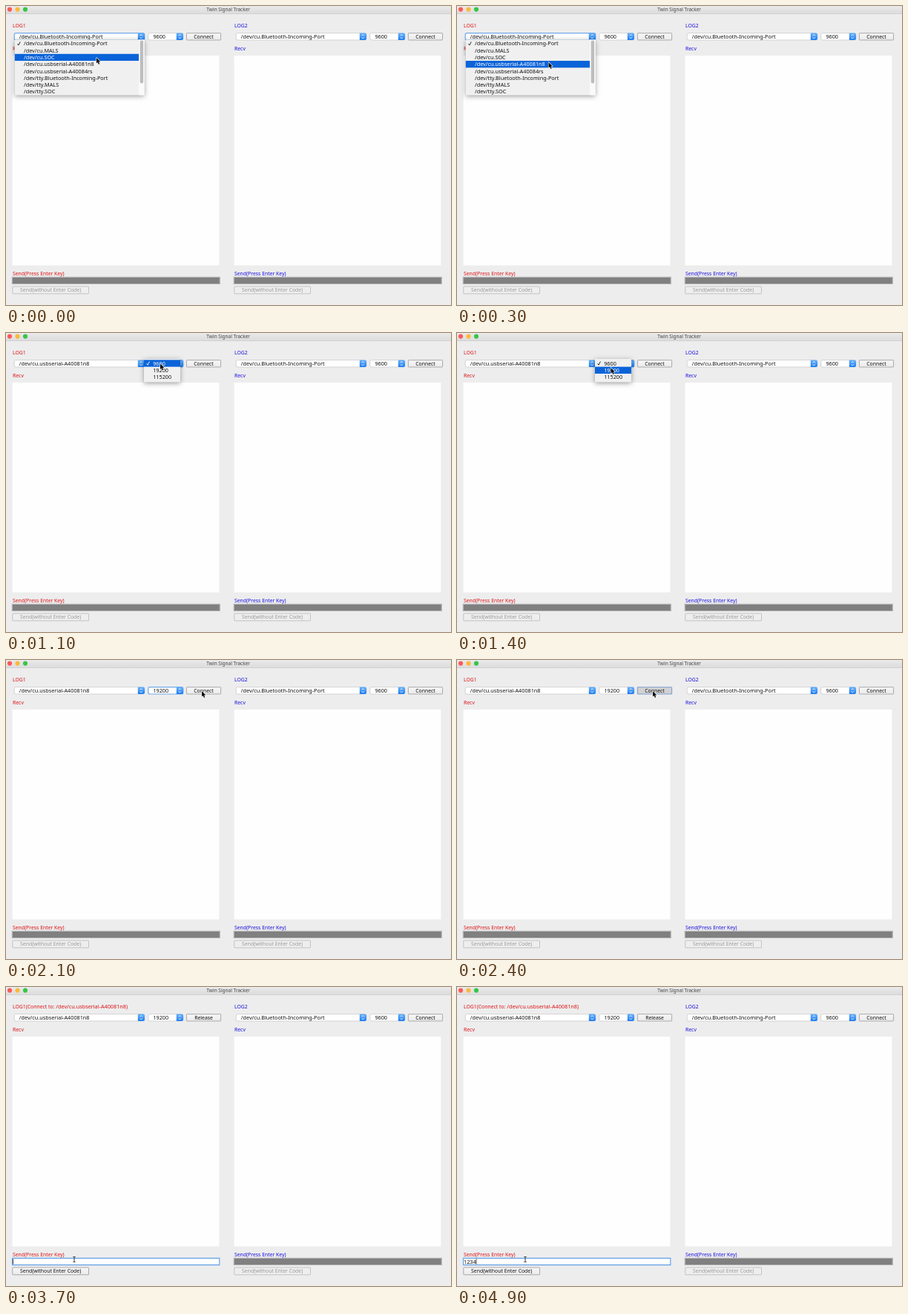
Animation, 600 px wide and 404 px high, one loop 5000 ms. Source, as an HTML page with a canvas:

```html
<!DOCTYPE html>
<html lang="en">
<head>
<meta charset="utf-8">
<title>Twin Signal Tracker</title>
<style>
html, body { margin: 0; width: 100%; height: 100%; overflow: hidden; background: #ededee; }
canvas { display: block; width: 600px; height: 404px; }
</style>
</head>
<body>
<canvas id="stage"></canvas>
<script>
const W = 600, H = 404, LOOP = 5000, STEP = 100;
const canvas = document.getElementById('stage');
const ctx = canvas.getContext('2d');
const dpr = window.devicePixelRatio || 1;
canvas.width = W * dpr;
canvas.height = H * dpr;

const RED = '#dc1414', BLUE = '#1a10dc', FOCUS = '#6fa9e6', PICK = '#0a63d8';
const LABEL = 6.85, VALUE = 7.28, ROW = 9.3;
const DEFAULT_PORT = '/dev/cu.Bluetooth-Incoming-Port';
const USB_PORT = '/dev/cu.usbserial-A40081n8';
const PORTS = [DEFAULT_PORT, '/dev/cu.MALS', '/dev/cu.SOC', USB_PORT,
  '/dev/cu.usbserial-A40084rs', '/dev/tty.Bluetooth-Incoming-Port',
  '/dev/tty.MALS', '/dev/tty.SOC'];
const RATES = ['9600', '19200', '115200'];

// pointer keys: time, x, y
const PATH = [
  [0, 122, 70], [100, 122, 72], [200, 123, 75], [300, 123.5, 76],
  [600, 123.5, 76], [700, 140, 68], [1000, 208, 40], [1200, 208, 43],
  [1400, 207.5, 47], [1700, 207.5, 47], [2100, 264, 42], [2500, 264, 42],
  [2800, 215, 160], [3100, 91, 383], [3200, 90, 387], [3400, 91, 381],
  [3600, 92, 368]
];
const KEYS = [[4300, '1'], [4400, '12'], [4700, '123'], [4900, '1234']];

function pointer(t) {
  for (let i = 1; i < PATH.length; i++) {
    const [t1, x1, y1] = PATH[i];
    if (t <= t1) {
      const [t0, x0, y0] = PATH[i - 1];
      const k = (t - t0) / (t1 - t0);
      return { x: x0 + (x1 - x0) * k, y: y0 + (y1 - y0) * k };
    }
  }
  const [, x, y] = PATH[PATH.length - 1];
  return { x, y };
}

function text(str, x, cy, size, color, align = 'left') {
  ctx.font = `${size}px "Noto Sans", "Open Sans", sans-serif`;
  ctx.textAlign = align;
  ctx.fillStyle = color;
  ctx.fillText(str, x, cy + 2.5);
  return ctx.measureText(str).width;
}

function rect(x, y, w, h, fill) {
  ctx.fillStyle = fill;
  ctx.fillRect(x, y, w, h);
}

function box(x, y, w, h, r, fill, stroke, line = 0.8) {
  ctx.beginPath();
  ctx.roundRect(x, y, w, h, r);
  ctx.fillStyle = fill;
  ctx.fill();
  if (!stroke) return;
  ctx.strokeStyle = stroke;
  ctx.lineWidth = line;
  ctx.stroke();
}

function shade(y0, y1, a, b) {
  const g = ctx.createLinearGradient(0, y0, 0, y1);
  g.addColorStop(0, a);
  g.addColorStop(1, b);
  return g;
}

function poly(points, color, line) {
  ctx.beginPath();
  points.forEach(([x, y]) => ctx.lineTo(x, y));
  ctx.strokeStyle = color;
  ctx.lineWidth = line;
  ctx.stroke();
}

function titleBar() {
  rect(0, 0, W, 10, shade(0, 10, '#ebeaeb', '#dddcdd'));
  rect(0, 10, W, 0.7, '#c6c5c6');
  ['#fc5b57', '#fbb93c', '#35c649'].forEach((color, i) => {
    ctx.beginPath();
    ctx.arc(5 + i * 10.5, 4.6, 3.1, 0, Math.PI * 2);
    ctx.fillStyle = color;
    ctx.fill();
  });
  text('Twin Signal Tracker', 299.7, 4.8, 6.5, '#444', 'center');
}

function combo(x, w, value, focused) {
  const y = 36.6, h = 9.4, end = x + w;
  box(x, y, w, h, 2, '#fff', focused ? FOCUS : '#c4c4c6', focused ? 1.2 : 0.7);
  box(end - 9, y, 9.2, h, [0, 2, 2, 0], shade(y, y + h, '#68b1fa', '#1c7cf2'));
  const cx = end - 4.5, cy = y + h / 2;
  for (const s of [-1, 1])
    poly([[cx - 1.6, cy + s], [cx, cy + s * 2.7], [cx + 1.6, cy + s]], '#fff', 0.9);
  text(value, x + 6.6, 41, VALUE, '#111');
}

function button(x, y, w, h, label, { off, focused, down } = {}) {
  const edge = focused ? '#7f9fd0' : off ? '#c0c0c2' : '#a2a2a4';
  const fill = down ? '#d2d2d4' : off ? '#eeeeef' : shade(y, y + h, '#f7f7f8', '#ebebec');
  box(x, y, w, h, 0.5, fill, edge, focused ? 1.1 : 0.9);
  text(label, x + w / 2, y + h / 2 - 0.2, LABEL, off ? '#999' : '#111', 'center');
}

function input(x, on, focused, value, caret) {
  if (!on) {
    box(x + 8.3, 366.3, 280, 9.2, 0, '#808080', '#b4b4b6', 1.2);
    return;
  }
  box(x + 8.5, 366.5, 279.3, 9, 0, focused ? '#fff' : '#f9f9fa',
    focused ? FOCUS : '#c6c6c8', focused ? 1.3 : 0.9);
  const width = text(value, x + 9, 371, VALUE, '#111');
  if (caret) rect(x + 9 + width, 367.5, 0.8, 7, '#222');
}

function panel(x, n, color, s) {
  const head = text('LOG' + n, x + 9, 26, LABEL, color);
  if (s.on) {
    let end = x + 9 + head;
    end += text('(Connect to: ', end, 26, LABEL, color);
    end += text(s.port, end, 26, VALUE, color);
    text(')', end, 26, LABEL, color);
  }
  combo(x + 11.2, 175.6, s.port, s.focus === 'port');
  combo(x + 191.8, 47, s.rate, s.focus === 'rate');
  button(x + 243.4, 36.7, 46.2, 9.3, s.on ? 'Release' : 'Connect',
    { focused: s.focus === 'button', down: s.down });
  text('Recv', x + 9, 57, LABEL, color);
  rect(x + 8.6, 67, 278.8, 283.5, '#fefefe');
  text('Send(Press Enter Key)', x + 9, 361, LABEL, color);
  input(x, s.on, s.focus === 'input', s.typed || '', s.caret);
  button(x + 8.8, 379, 102.7, 9.8, 'Send(without Enter Code)', { off: !s.on });
}

function menu(x, y, w, h, top, items, hot, scroll) {
  ctx.save();
  ctx.shadowColor = 'rgba(0,0,0,.38)';
  ctx.shadowBlur = 6 * dpr;
  ctx.shadowOffsetY = 1.5 * dpr;
  box(x, y, w, h, 1, '#f0f0f0');
  ctx.restore();
  const inner = scroll ? w - 7.5 : w;
  items.forEach((item, i) => {
    const cy = top + i * ROW;
    if (i === hot) rect(x, cy - ROW / 2, inner, ROW, PICK);
    const ink = i === hot ? '#fff' : '#111';
    text(item, x + 12.2, cy, VALUE, ink);
    if (i === 0)
      poly([[x + 3.6, cy + 0.3], [x + 5, cy + 2.2], [x + 7.4, cy - 2.4]], ink, 0.9);
  });
  if (scroll) {
    rect(x + inner, y, w - inner, h, '#fafafa');
    box(x + inner + 1.6, y + 1, 4.4, 58, 2, '#bdbdbf');
  }
}

function arrow(x, y) {
  const shape = [[0, 0], [0, 7.6], [1.7, 6.1], [2.9, 8.9], [4.2, 8.3], [3, 5.6], [5.3, 5.4]];
  ctx.beginPath();
  shape.forEach(([dx, dy]) => ctx.lineTo(x + dx, y + dy));
  ctx.closePath();
  ctx.lineJoin = 'round';
  ctx.strokeStyle = '#fff';
  ctx.lineWidth = 1.2;
  ctx.stroke();
  ctx.fillStyle = '#000';
  ctx.fill();
  ctx.lineJoin = 'miter';
}

function beam(x, y) {
  rect(x - 0.45, y - 3.6, 0.9, 7.2, '#222');
  rect(x - 1.7, y - 4, 3.4, 0.8, '#333');
  rect(x - 1.7, y + 3.2, 3.4, 0.8, '#333');
}

function draw(t) {
  const p = pointer(t);
  const portMenu = t < 500;
  const rateMenu = t >= 1100 && t < 1600;
  const on = t >= 2500;
  const left = {
    on,
    port: t < 500 ? DEFAULT_PORT : USB_PORT,
    rate: t < 1600 ? '9600' : '19200',
    focus: t < 1100 ? 'port' : t < 2300 ? 'rate' : t < 3600 ? 'button' : 'input',
    down: t >= 2300 && t < 2500,
    typed: KEYS.reduce((s, [at, v]) => t >= at ? v : s, ''),
    caret: t >= 3600 && !(t >= 4000 && t < 4300)
  };

  ctx.setTransform(dpr, 0, 0, dpr, 0, 0);
  rect(0, 0, W, H, '#ededee');
  titleBar();
  panel(0, 1, RED, left);
  panel(299, 2, BLUE, { port: DEFAULT_PORT, rate: '9600' });

  const hover = top => Math.max(0, Math.floor((p.y - top) / ROW + 0.5));
  if (portMenu) menu(11.8, 45.6, 174.8, 74.8, 50.8, PORTS, hover(50.8), true);
  if (rateMenu) menu(186, 35, 49, 31.6, 41, RATES, hover(41), false);

  const overLog = p.x < 287 && p.y > 67 && p.y < 350;
  const overInput = on && p.y > 366 && p.y < 376;
  if (!portMenu && !rateMenu && (overLog || overInput)) beam(p.x, p.y);
  else arrow(p.x, p.y);
}

function tick() {
  const t = performance.now() % LOOP;
  draw(Math.floor(t / STEP) * STEP);
  requestAnimationFrame(tick);
}
tick();
</script>
</body>
</html>
```
